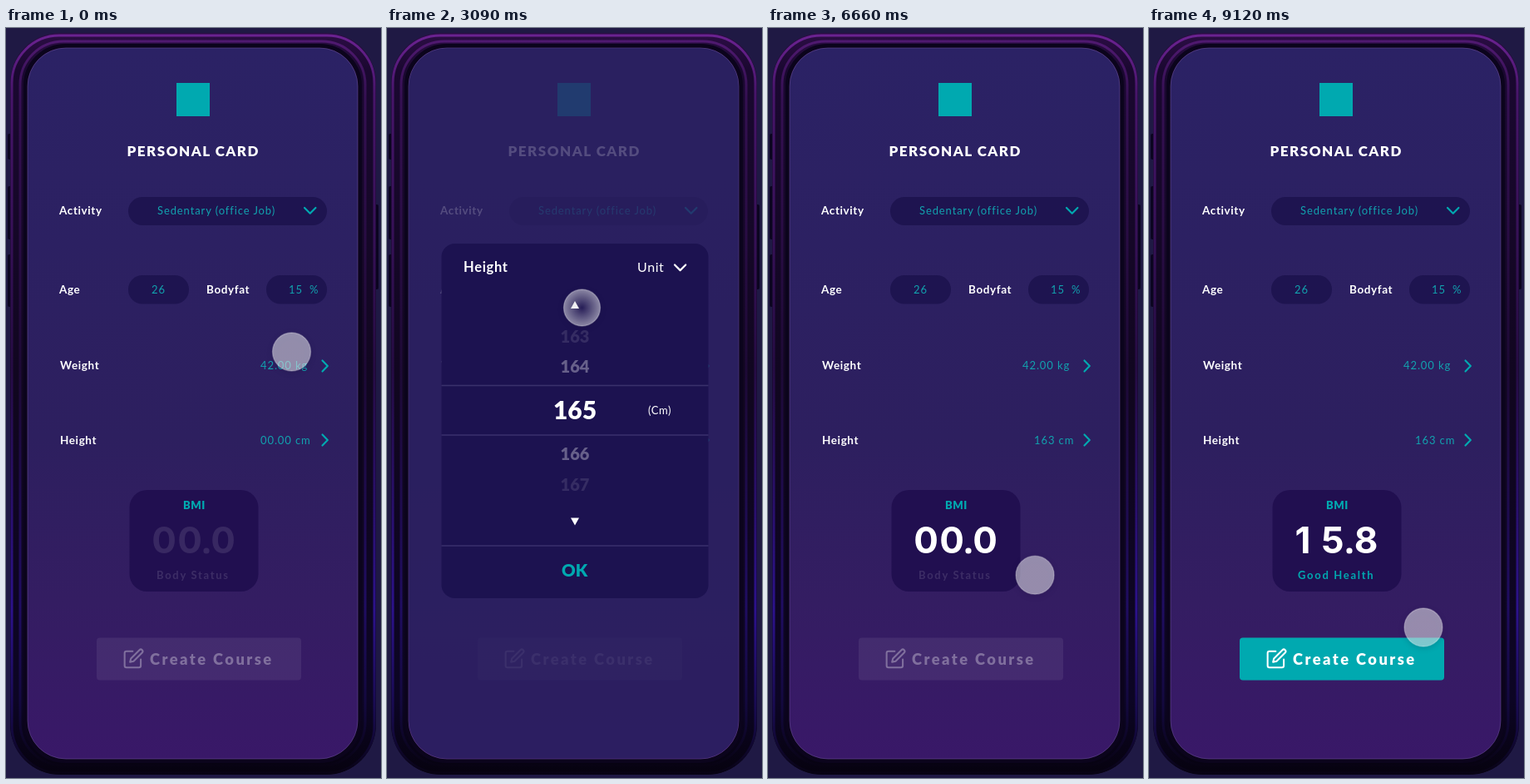
An HTML page for the animation above (9.36 s loop, 451 px wide and 901 px high).

```html
<!DOCTYPE html>
<html lang="en">
<head>
<meta charset="utf-8">
<title>Personal card</title>
<style>
  html, body { margin: 0; width: 100%; height: 100%; overflow: hidden; background: #1f1944; }
  svg { display: block; width: 451px; height: 901px; }
  text { font-family: Lato, "Open Sans", sans-serif; white-space: pre; }
  .b { font-weight: 700; }
  .k { font-weight: 900; }
  .mid { text-anchor: middle; }
  .num { font: 700 44px Inter, "Open Sans", sans-serif; text-anchor: middle; }
  .line { fill: none; stroke-width: 2.2; stroke-linecap: round; stroke-linejoin: round; }
</style>
</head>
<body>
<svg viewBox="0 0 451 901">
  <defs>
    <linearGradient id="wall" x2="0" y2="1">
      <stop offset="0" stop-color="#2b2265"/>
      <stop offset=".55" stop-color="#2d1f5f"/>
      <stop offset=".78" stop-color="#341d62"/>
      <stop offset="1" stop-color="#391868"/>
    </linearGradient>
    <linearGradient id="body" x2="0" y2="1">
      <stop offset="0" stop-color="#2c0d45"/>
      <stop offset=".05" stop-color="#1a0830"/>
      <stop offset=".5" stop-color="#10061f"/>
      <stop offset=".9" stop-color="#0c0524"/>
      <stop offset="1" stop-color="#06020f"/>
    </linearGradient>
    <linearGradient id="rim" x2="0" y2="1">
      <stop offset="0" stop-color="#6a2290"/>
      <stop offset=".08" stop-color="#47156a"/>
      <stop offset=".45" stop-color="#260c44"/>
      <stop offset=".78" stop-color="#2c128c"/>
      <stop offset=".93" stop-color="#160a48"/>
      <stop offset="1" stop-color="#080314"/>
    </linearGradient>
    <radialGradient id="touch">
      <stop id="core" offset="0" stop-color="#fff" stop-opacity=".5"/>
      <stop offset="1" stop-color="#fff" stop-opacity=".5"/>
    </radialGradient>
    <clipPath id="window"><rect x="150" y="587" width="152" height="51"/></clipPath>
  </defs>

  <g id="phone">
    <g fill="#0b0520">
      <rect x="2" y="127" width="5" height="31" rx="2"/>
      <rect x="2" y="190" width="5" height="64" rx="2"/>
      <rect x="2" y="272" width="5" height="63" rx="2"/>
      <rect x="443" y="212" width="5" height="102" rx="2"/>
    </g>
    <rect x="5" y="6" width="440" height="891" rx="60" fill="url(#body)"/>
    <g fill="none" stroke="url(#rim)">
      <rect x="7" y="9" width="436" height="886" rx="57" stroke-width="3"/>
      <rect x="17" y="16" width="415" height="870" rx="52" stroke-width="3" opacity=".6"/>
    </g>
    <rect x="23.500" y="21.500" width="402" height="859" rx="48" fill="none" stroke="#0b041c" stroke-width="5"/>
    <rect x="26" y="24" width="397" height="854" rx="46" fill="url(#wall)" stroke="#7457a4" stroke-opacity=".5"/>
  </g>

  <g id="card"></g>
  <rect id="veil" x="26.5" y="24.5" width="396" height="853" rx="46" fill="#2a2060"/>
  <g id="popup"></g>
  <circle id="finger" r="23" fill="url(#touch)" stroke="#fff" stroke-opacity=".28" stroke-width="1.3"
          style="filter:drop-shadow(0 2px 3px rgba(10,5,40,.3))"/>
</svg>

<script>
const LOOP = 9360, TEAL = '#00a9b0', SOFT = '#12a2ae', PITCH = 47;
const $ = id => document.getElementById(id);

const text = (x, y, size, str, { c = '', ls = 0, fill = '#fff', id = '', o = 1 } = {}) =>
  `<text id="${id}" class="${c}" x="${x}" y="${y}" font-size="${size}" letter-spacing="${ls}" fill="${fill}" opacity="${o}">${str}</text>`;
const box = (x, y, w, h, rx, fill, id = '') =>
  `<rect id="${id}" x="${x}" y="${y}" width="${w}" height="${h}" rx="${rx}" fill="${fill}"/>`;
const line = (d, color) => `<path class="line" d="${d}" stroke="${color}"/>`;
const label = (x, y, str) => text(x, y, 13.5, str, { c: 'b', ls: .6 });
const value = (x, y, str, id) => text(x, y, 13, str, { ls: .9, fill: SOFT, id });

// BMI digits: centre of each slot, the number it rolls to, and when it stops
const slots = [
  { x: 190, n: 1, end: 8150 },
  { x: 221, n: 5, end: 8300 },
  { x: 261, n: 8, end: 8260 }
];
const strip = ({ x, n }, k) => `<g id="slot${k}">` +
  Array.from({ length: n + 1 }, (_, i) =>
    `<text class="num" x="${i === 1 && !k ? 185 : x}" y="${631 + i * PITCH}">${i}</text>`).join('') + '</g>';

$('card').innerHTML =
  box(205, 66, 40, 40, 0, TEAL) +
  text(145.5, 154, 17, 'PERSONAL CARD', { c: 'k', ls: 1.5 }) +
  label(64, 224, 'Activity') + label(64, 319, 'Age') + label(241, 319, 'Bodyfat') +
  label(65, 410, 'Weight') + label(65, 500, 'Height') +
  box(147, 203, 239, 34, 17, '#1e1450') +
  box(147, 297, 73, 34.5, 17, '#1e1450') +
  box(313, 297, 73, 34.5, 17, '#1e1450') +
  value(182, 224, 'Sedentary (office Job)') + value(175, 319, '26') +
  value(340, 319, '15') + value(365, 319, '%') +
  value(306, 410, '42.00 kg') + value(306, 500, '00.00 cm', 'height') +
  line('M359 216l6.7 6.7 6.7-6.7', TEAL) +
  line('M380.5 399.5l6.3 6.5-6.3 6.5M380.5 488.5l6.3 6.5-6.3 6.5', TEAL) +
  box(148.5, 555, 155, 122, 21, '#210f50') +
  text(213, 578, 13, 'BMI', { c: 'k', ls: .5, fill: TEAL }) +
  `<g id="bmi" fill="#fff" clip-path="url(#window)">${slots.map(strip).join('')}
    <circle cx="241" cy="628" r="3.6"/></g>` +
  text(181, 662, 13, 'Body Status', { c: 'b', ls: 1.7, id: 'waiting' }) +
  text(179, 662, 13, 'Good Health', { c: 'b', ls: 1.7, fill: TEAL, id: 'result' }) +
  box(109, 732.5, 246, 51, 4, '#fff', 'plate') +
  box(109, 732.5, 246, 51, 4, TEAL, 'active') +
  `<g id="create">
    <path class="line" stroke="#fff" style="stroke-width:1.9" transform="translate(140.5 744.5) scale(1.08)"
      d="M11 4H4a2 2 0 0 0-2 2v14a2 2 0 0 0 2 2h14a2 2 0 0 0 2-2v-7M18.5 2.5a2.12 2.12 0 0 1 3 3L12 15l-4 1 1-4z"/>
    ${text(173, 764.5, 18.3, 'Create Course', { c: 'k', ls: 2.45 })}
  </g>`;
$('plate').setAttribute('fill-opacity', .07);

$('popup').innerHTML =
  box(65.5, 259, 321, 426, 16, '#1c1250') +
  text(92, 293, 16.5, 'Height', { c: 'b', ls: .7 }) +
  text(301, 293, 16, 'Unit', { ls: .6 }) +
  line('M346 284.5l6.6 6.6 6.6-6.6', '#fff') +
  '<path d="M221 337h10l-5-9zM221 588.5h10l-5 9z" fill="#fff"/>' +
  '<path d="M65.5 429.5h321M65.5 489h321M65.5 622h321" stroke="#3a316c" stroke-width="1.3"/>' +
  [160, 161, 162, 163, 164, 165, 166, 167, 168].map(n =>
    text(226, 0, 20, n, { c: 'k mid', id: 'n' + n })).join('') +
  text(314, 464, 13, '(Cm)', { ls: .6 }) +
  text(210, 659, 20.5, 'OK', { c: 'k', fill: TEAL });

// Finger stops: time, x, y, then optional bend on the way there
const stops = [
  [250, 343.5, 389],
  [1050, 331, 495],
  [1865, 331, 495],
  [2800, 234.5, 336],
  [4458, 234.5, 336],
  [5650, 238, 652, 29.5, 0],
  [6082, 238, 652],
  [7050, 365.5, 649, 0, 8],
  [8450, 365.5, 649],
  [9120, 330, 720]
];
const taps = [1300, 3090, 3740, 5820];

const ramp = (t, a, b) => Math.min(1, Math.max(0, (t - a) / (b - a)));
const ease = (t, a, b) => (1 - Math.cos(Math.PI * ramp(t, a, b))) / 2;
const mix = (a, b, u) => a + (b - a) * u;
const set = (id, attrs) => {
  for (const k in attrs) $(id).setAttribute(k, attrs[k]);
};

function fingerAt(t) {
  const i = stops.findIndex(s => s[0] > t);
  if (i < 1) return (i ? stops[stops.length - 1] : stops[0]).slice(1, 3);
  const [a, x0, y0] = stops[i - 1], [b, x1, y1, bx = 0, by = 0] = stops[i];
  const u = ease(t, a, b), bend = Math.sin(Math.PI * u);
  return [mix(x0, x1, u) + bx * bend, mix(y0, y1, u) + by * bend];
}

function drawPicker(v) {
  const dist = [0, 52.5, 89, 115], size = [30, 20, 20, 20], alpha = [1, .33, .11, 0];
  for (let n = 160; n <= 168; n++) {
    const d = n - v, a = Math.min(Math.abs(d), 2.999), i = Math.floor(a);
    const at = list => mix(list[i], list[i + 1], a - i);
    const s = at(size);
    set('n' + n, { y: 459.3 + Math.sign(d) * at(dist) + s * .36, 'font-size': s, opacity: at(alpha) });
  }
}

function draw(t) {
  const [x, y] = fingerAt(t);
  const press = Math.max(...taps.map(p => Math.sin(Math.PI * ramp(t, p - 150, p + 150))));
  set('finger', { cx: x, cy: y, r: 23 - press });
  set('core', { 'stop-opacity': .5 * (1 - .9 * press) });

  const open = ease(t, 1500, 1980) - ease(t, 5900, 6300);
  set('popup', { opacity: open });
  set('veil', { opacity: .8 * open });
  drawPicker(165 - ease(t, 3150, 3400) - ease(t, 3790, 4040));

  const chosen = t > 4000;
  $('height').textContent = chosen ? '163 cm' : '00.00 cm';
  set('height', { x: chosen ? 320 : 306 });

  set('bmi', { opacity: mix(.1, 1, ease(t, 6300, 6620)) });
  slots.forEach(({ n, end }, k) =>
    set('slot' + k, { transform: `translate(0 ${-PITCH * n * ease(t, 7000, end)})` }));

  const done = ease(t, 8300, 8550), ready = ease(t, 8500, 8800);
  set('waiting', { opacity: .12 * (1 - done) });
  set('result', { opacity: done });
  set('active', { opacity: ready });
  set('create', { opacity: mix(.32, 1, ready) });
}

const start = performance.now();
function tick() {
  draw((performance.now() - start) % LOOP);
  requestAnimationFrame(tick);
}
tick();
</script>
</body>
</html>
```
